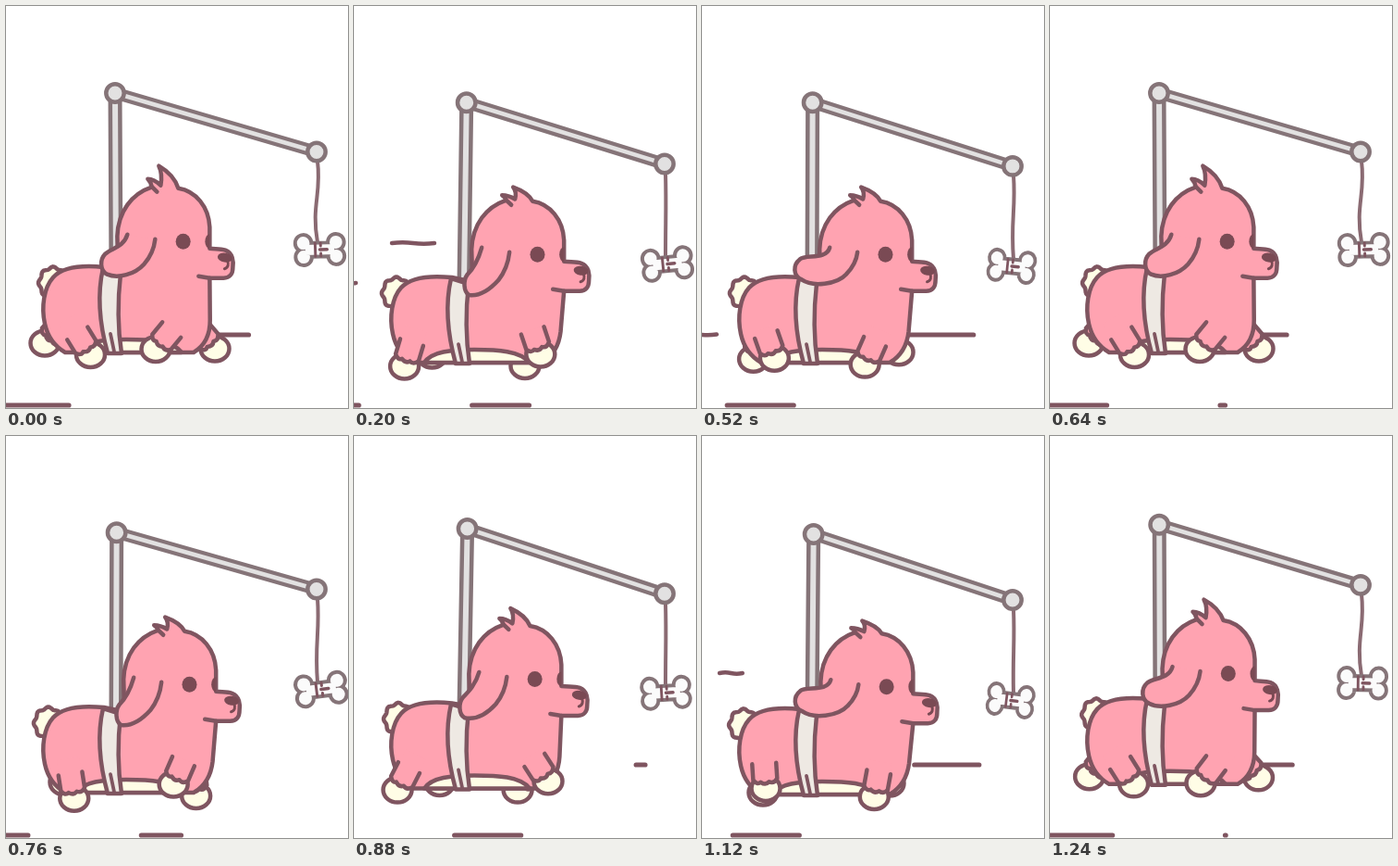
These frames come from a looping animation (370 by 434 pixels, 1280 ms). An HTML page with a canvas:

```html
<!DOCTYPE html>
<html lang="en">
<head>
<meta charset="utf-8">
<title>Running dog</title>
<style>
  html, body { margin: 0; width: 100%; height: 100%; overflow: hidden; background: #fff; }
  canvas { display: block; width: 370px; height: 434px; }
</style>
</head>
<body>
<canvas id="stage"></canvas>
<script>
const W = 370, H = 434, LOOP = 1280, STRIDE = 640, STEP = 40;
const PINK = '#ffa3b1', INK = '#7f5560', CREAM = '#fffde6', BAND = '#eee9e3';
const STEEL = '#e2e1e1', STEEL_INK = '#857478', DARK = '#7a4a54';

const canvas = document.getElementById('stage');
const ctx = canvas.getContext('2d');
const dpr = window.devicePixelRatio || 1;
canvas.width = W * dpr;
canvas.height = H * dpr;

let angle = 0; // position in the stride
let dip = 0;   // 0 with the body up, 1 with it down; twice per stride
let turn = 0;  // how far the face points forward

const wave = (mid, c, s) => mid + c * Math.cos(angle) + s * Math.sin(angle);
const clamp = v => Math.min(1, Math.max(0, v));

const bodyDrop = () => 13 * (dip - .08);

// Moves a point with the bobbing body; the head travels further.
function bend(x, y) {
  const k = dip - .08;
  const head = x > 118 ? clamp((365 - y) / 60) : 0;
  const face = x > 223 ? 4 * turn : 0;
  const tuft = Math.max(0, 197 - y) * .45 * dip;
  return [x + 8 * k * head + face, y + k * (13 + 3.5 * head) + tuft];
}

const bent = d => new Path2D(d.replace(/([\d.]+) ([\d.]+)/g, (m, x, y) => bend(+x, +y).join(' ')));

function paint(path, fill, stroke = INK, width = 4.5) {
  if (fill) { ctx.fillStyle = fill; ctx.fill(path); }
  if (stroke) { ctx.strokeStyle = stroke; ctx.lineWidth = width; ctx.stroke(path); }
}

function oval(x, y, rx, ry = rx, from = 0, to = Math.PI * 2, tilt = 0) {
  const path = new Path2D();
  path.ellipse(x, y, rx, ry, tilt, from, to);
  return path;
}

function line(x1, y1, x2, y2, color = INK, width = 4.5) {
  paint(new Path2D(`M${x1} ${y1} L${x2} ${y2}`), null, color, width);
}

function rod(x1, y1, x2, y2, outer, inner) {
  line(x1, y1, x2, y2, STEEL_INK, outer);
  line(x1, y1, x2, y2, STEEL, inner);
}

// Runs a drawing in a moved frame
function at(x, y, draw) {
  ctx.save();
  ctx.translate(x, y);
  draw();
  ctx.restore();
}

// Evenly spaced ground lines sliding left, seen between lo and hi
function streaks(t, y, start, length, lo, hi) {
  for (let k = -1; k < 5; k++) {
    const x = start - .314 * t + 194.5 * k;
    const a = Math.max(lo, x), b = Math.min(hi, x + length);
    if (b - a > 3) line(a + 2, y, b - 2, y, INK, 5.2);
  }
}

// A short wavy line that shoots out and shrinks towards the left
function gust(t, y, shift) {
  if (t < 120) return;
  const right = Math.min(92, 88 - .294 * (t - 200));
  const left = Math.max(40 - .15 * (t - 200), 92 - .65 * (t - 120));
  if (right < 12 || right - left < 3) return;
  const a = left + shift + 1, b = right + shift - 1, m = (a + b) / 2;
  paint(new Path2D(`M${a} ${y} Q${(a + m) / 2} ${y - 1.5} ${m} ${y} T${b} ${y}`), null);
}

function background(t) {
  streaks(t, 431, -6, 76, -5, 191.5);
  streaks(t, 355, 190.5, 74, 110, 317);
  gust(t, 256, 0);
  gust(t - 773, 256, 0);
  gust(t - 265, 354.5, -55);
  gust(t + 85, 299, -60);
}

function drawBone() {
  const bone = new Path2D();
  for (const x of [-18, 18]) for (const y of [-7.5, 7.5]) bone.addPath(oval(x, y, 7));
  bone.rect(-16, -5.5, 32, 11);
  paint(bone, null, STEEL_INK, 8);
  paint(bone, '#fbfbfb', null);
  line(-5, -7, -5, 7, INK, 3);
  line(1, -7, 1, -4, INK, 3);
  line(0, 0, 8, 0, INK, 3.5);
  line(1, 4, 1, 7, INK, 3);
}

function rig() {
  const poleX = wave(120.7, -2.7, 0), poleY = 94 + 12 * dip;
  const armX = 336, armY = wave(164, -6.5, -4) + 9 * dip;
  const boneX = wave(337, 2.5, 3.2), boneY = armY + 105.5 + 3 * dip;
  rod(poleX, poleY, 119, 290 + bodyDrop(), 15, 6);
  rod(poleX, poleY, armX, armY, 13, 4.5);

  const x = armX + 1, top = armY + 10, end = boneY - 8, drop = end - top;
  const slack = Math.max(0, wave(.5, 3, 0));
  paint(new Path2D(`M${x} ${top} C${x + 1 + slack} ${top + drop * .4} ${x - 2 * slack} ${top + drop * .55} ${x} ${end}`),
    null, '#8a6a72', 4);
  paint(oval(poleX, poleY, 9.7), STEEL, STEEL_INK);
  paint(oval(armX, armY, 9.7), STEEL, STEEL_INK);

  at(boneX, boneY, () => {
    ctx.rotate(wave(0, -2, -7) * Math.PI / 180);
    ctx.scale(wave(.95, .03, .045), 1);
    drawBone();
  });
}

function leg(hipX, x, y, side) {
  const [hx, hy] = bend(hipX, 338);
  const dx = hx - x, dy = y + bodyDrop() - hy;
  const hem = '-13 -10 Q-9 -4 -5 -7 Q0 -3 4 -7 Q9 -4 13 -10';
  at(x, y + bodyDrop(), () => {
    paint(oval(0, 0, 15.5, 13.5), CREAM);
    ctx.rotate(Math.atan2(dx, dy));
    paint(new Path2D(`M${hem} L12 ${-Math.hypot(dx, dy)} H-12 Z`), PINK, null);
    paint(new Path2D(`M-13 ${-10 - side} L${hem} V${-10 - side}`), null);
  });
}

function tail() {
  const [x, y] = bend(51, 300);
  const path = new Path2D();
  for (let a = 0; a < 6.3; a += .1) {
    const r = 15 + Math.cos(a * 8);
    path.lineTo(x - 6 * dip + r * Math.cos(a), y + r * 1.1 * Math.sin(a));
  }
  path.closePath();
  paint(path, CREAM);
}

// The ear hangs from the head; its tip flops with the stride.
function ear() {
  const q = wave(0, 0, 9), k = dip - .08;
  at(8 * k, 16.5 * k, () => paint(new Path2D(
    `M132 248 C128 262 ${114 + q} ${263 + q} ${108 + q} ${269 + q}
     C${102 + q * 1.2} ${275 + q} ${102 + q * 1.2} ${287 + q} ${110 + q} ${291 + q}
     C${122 + q} ${296 + q * .6} 140 ${291 + q * .4} 150 ${280 + q * .4}
     C157 ${272 + q * .3} 161 262 162 253`), PINK));
}

function dog() {
  tail();
  leg(66, wave(70, -28, 4), wave(369, -4, -4), 22);
  leg(198, wave(199, 27, -4), wave(371, 0, 8), 22);

  paint(bent('M106 283 C86 281 62 282 51 294 C41 305 38 326 42 344 C45 358 52 368 64 375 ' +
    'L203 375 C215 368 221 356 221 340 L221 295 L236 295 C243 295 246 290 246 284 ' +
    'C247 277 246 268 238 265 C232 263 226 264 221 263 L221 240 C220 218 206 201 187 198 ' +
    'C184 189 178 181 166 174 C170 182 169 189 168 195 C164 191 160 188 154 188 ' +
    'C157 191 158 193 158 197 C137 204 122 223 121 250 L122 285 Z'), PINK);
  paint(bent('M158 196 L164 202'), null);

  at(0, bodyDrop(), () => {
    paint(new Path2D('M76 375 C84 363 105 361 130 361 S180 362 190 375 Z'), CREAM);
    paint(new Path2D('M105 284 C99 310 100 340 110 376 L125 376 C121 350 120 325 124 290 Z'), BAND);
    line(113, 355, 117, 374, INK, 3.8);
  });

  leg(67, wave(66.5, 25, -2.5), wave(374.5, 3, 6), 17);
  leg(190, wave(189, -27, 2.7), wave(371.5, 0, -6), 17);

  paint(bent('M209 293 L221 295'), null);
  paint(oval(...bend(192.3, 255.5), 8, 8.5), DARK, null);
  paint(oval(...bend(221, 255.5), 5, 8, Math.PI / 2, Math.PI * 1.5), DARK, null);
  paint(oval(...bend(237.5, 273), 8, 5, 0, Math.PI * 2, .15), DARK, null);
  paint(bent('M240 276 C242 280 241 284 237 285'), null, DARK, 3);
  ear();
}

function draw(time) {
  const t = Math.floor(time % LOOP / STEP) * STEP;
  angle = t / STRIDE * 2 * Math.PI;
  dip = (1 - Math.cos(2 * angle)) / 2;
  turn = wave(.5, -.5, 0) ** 2;
  ctx.setTransform(dpr, 0, 0, dpr, 0, 0);
  ctx.fillStyle = '#fff';
  ctx.fillRect(0, 0, W, H);
  ctx.lineCap = ctx.lineJoin = 'round';
  background(t);
  rig();
  dog();
}

const start = performance.now();
function tick() {
  draw(performance.now() - start);
  requestAnimationFrame(tick);
}
tick();
</script>
</body>
</html>
```
